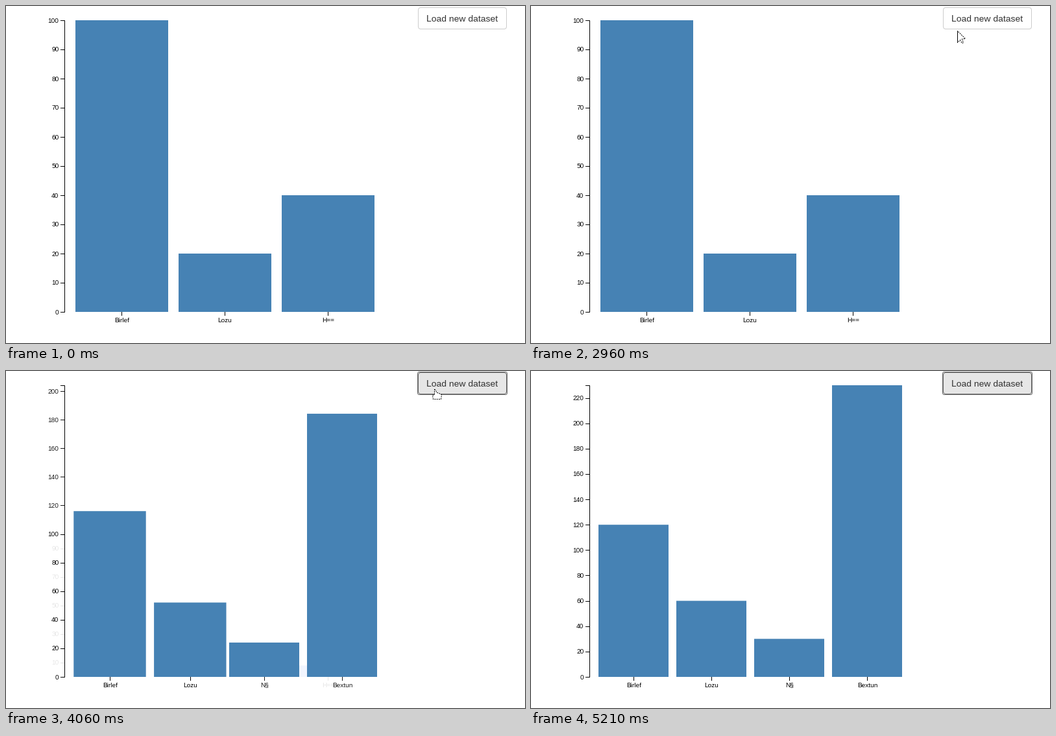
A matplotlib script for the animation above (6.6 s loop, 800 by 520 pixels).

```python
import numpy as np
import matplotlib.pyplot as plt
from matplotlib.animation import FuncAnimation
from matplotlib.patches import FancyBboxPatch, Polygon, Rectangle

plt.rcParams["font.family"] = "Liberation Sans"
plt.rcParams["text.hinting"] = "native"
plt.rcParams["toolbar"] = "None"

W, H, DPI = 800, 520, 100
LOOP, STEP = 6600, 20
PX = 72 / DPI                      # points per pixel
BASE, HEIGHT, AXIS_X = 472, 450, 90
STEEL = np.array([70, 130, 180]) / 255
HOVER = np.array([112, 159, 210]) / 255
FADED = np.array([125, 163, 255]) / 255

CLICK, MORPH, MORPH_LEN = 3290, 3377, 962

# Pointer keys: time, x, y
KEYS = np.array([
    (1300, 822, 450), (1350, 788, 412), (1720, 614, 30), (1860, 614, 30),
    (2140, 503, 264), (2510, 470, 345), (2550, 470, 345), (2960, 657, 38),
    (3040, 661, 29), (4320, 661, 29), (4560, 459, 297), (4640, 434, 341),
    (4690, 434, 341), (5300, 392, 531)], float)
SHOWN = (1350, 5200)

fig = plt.figure(figsize=(W / DPI, H / DPI), dpi=DPI, facecolor="white")
ax = fig.add_axes([0, 0, 1, 1])
ax.set_xlim(0, W)
ax.set_ylim(H, 0)
ax.axis("off")


def mix(a, b, k):
    return a + (b - a) * k


def ease(u):
    u = min(max(u, 0), 1)
    return 4 * u ** 3 if u < 0.5 else 1 - 4 * (1 - u) ** 3


def slopes(times, vals):
    d = np.diff(vals) / np.diff(times)
    inner = [2 * a * b / (a + b) if a * b > 0 else 0 for a, b in zip(d, d[1:])]
    return [0, *inner, 0]


TIMES = KEYS[:, 0]
TRACKS = [(KEYS[:, c], slopes(TIMES, KEYS[:, c])) for c in (1, 2)]


def pointer(t):
    """Monotone cubic path through the pointer keys."""
    i = int(np.clip(np.searchsorted(TIMES, t, "right") - 1, 0, len(TIMES) - 2))
    span = TIMES[i + 1] - TIMES[i]
    u = (t - TIMES[i]) / span
    s = u * u * (3 - 2 * u)
    return [mix(v[i], v[i + 1], s)
            + span * (u * (1 - u) ** 2 * m[i] - u * u * (1 - u) * m[i + 1])
            for v, m in TRACKS]


def stroke(xs, ys, **kw):
    """One pixel wide line, sharp when centred on a pixel."""
    return ax.plot(xs, ys, color="black", lw=PX, solid_capstyle="butt",
                   solid_joinstyle="miter", snap=False, **kw)[0]


def label(x, y, s, size, **kw):
    return ax.text(x, y, s, fontsize=size * PX, va="baseline", **kw)


class Bar:
    """A bar going from one (x, width, height) to another."""

    def __init__(self, start, end, leaving=False, z=2):
        self.start, self.end = np.array(start, float), np.array(end, float)
        self.leaving = leaving
        self.patch = Rectangle((0, 0), 1, 1, lw=0, zorder=z)
        self.patch.set_snap(False)
        ax.add_patch(self.patch)

    def update(self, k, tip):
        x, w, h = mix(self.start, self.end, k)
        self.patch.set_bounds(x, BASE - h, w, h)
        over = tip and x <= tip[0] < x + w and BASE - h <= tip[1] < BASE
        color = HOVER if over else STEEL
        if self.leaving:
            color = mix(color, FADED, k)
            self.patch.set_alpha(1 - k)
        self.patch.set_facecolor(color)


class Tick:
    """An axis tick with its label; it moves and may fade in or out."""

    def __init__(self, text, start, end, fade=0, vertical=True):
        self.start, self.end, self.fade = start, end, fade
        self.vertical = vertical
        if vertical:
            self.line = stroke([AXIS_X - 6, AXIS_X], [0, 0])
            self.text = label(AXIS_X - 8.5, 0, text, 10, ha="right")
        else:
            self.line = stroke([0, 0], [BASE, BASE + 6])
            self.text = label(0, BASE + 16, text, 10, ha="center")

    def update(self, k):
        p = mix(self.start, self.end, k)
        mid = round(p) + 0.5
        if self.vertical:
            self.line.set_ydata([mid, mid])
            self.text.set_y(p + 3.5)
        else:
            self.line.set_xdata([mid, mid])
            self.text.set_x(p + 0.5)
        alpha = {0: 1, 1: k, -1: 1 - k}[self.fade]
        for part in (self.line, self.text):
            part.set_alpha(alpha)
            part.set_visible(alpha > 0 and p > -20)


class Sprite:
    """White pointer shape with a dashed rim and an optional solid side."""

    def __init__(self, points, side=None):
        self.points = np.array(points, float)
        self.side = side
        self.body = Polygon(self.points, closed=True, fc="white", lw=0, zorder=8)
        ax.add_patch(self.body)
        self.rim = stroke([], [], zorder=9, dashes=(2, 1.3))
        self.edge = stroke([], [], zorder=9)

    def update(self, x, y, visible):
        pts = self.points + (x, y)
        self.body.set_xy(pts)
        loop = np.vstack([pts, pts[:1]])
        self.rim.set_data(loop[:, 0], loop[:, 1])
        if self.side:
            self.edge.set_data(pts[self.side, 0], pts[self.side, 1])
        for part in (self.body, self.rim, self.edge):
            part.set_visible(visible)


def box(x0, y0, x1, y1, r, **kw):
    patch = FancyBboxPatch((x0, y0), x1 - x0, y1 - y0,
                           boxstyle=f"round,pad=0,rounding_size={r}",
                           lw=PX, snap=False, **kw)
    ax.add_patch(patch)
    return patch


# Bars: x, width, height for each dataset
unit0, unit1 = HEIGHT / 100, HEIGHT / 230
bars = [
    Bar((425, 143, 40 * unit0), (425, 143, 0), leaving=True, z=1),
    Bar((107, 143, 100 * unit0), (104, 108, 120 * unit1)),
    Bar((266, 143, 20 * unit0), (224, 108, 60 * unit1)),
    Bar((344, 108, 0), (344, 108, 30 * unit1)),
    Bar((464, 108, 0), (464, 108, 230 * unit1)),
]

# Axes
stroke([AXIS_X - 6, AXIS_X + 0.5, AXIS_X + 0.5, AXIS_X - 6],
       [22.5, 22.5, BASE + 0.5, BASE + 0.5])
ticks = []
for v in range(0, 221, 10):
    if v > 100 and v % 20:
        continue
    fade = 1 if v > 100 else -1 if v % 20 else 0
    ticks.append(Tick(str(v), BASE - v * unit0, BASE - v * unit1, fade))
for name, a, b, fade in [("Birlef", 178, 158, 0), ("Lozu", 337, 278, 0),
                         ("H==", 496, 496, -1), ("N§", 398, 398, 1),
                         ("Bextun", 518, 518, 1)]:
    ticks.append(Tick(name, a, b, fade, vertical=False))

# Button
ring = box(634.5, 1.5, 772.5, 36.5, 2.5, fc="none", ec="#707070", zorder=4)
button = box(635.5, 2.5, 771.5, 35.5, 4, fc="white", ec="#cccccc", zorder=3)
label(703.5, 24, "Load new dataset", 14, ha="center", color="#333333", zorder=5)

arrow = Sprite([(0.5, 0.5), (0.5, 18.5), (4.5, 14.5), (7.5, 19.5),
                (9.5, 18.5), (7.5, 13), (12.5, 12.5)], side=[0, 1])
hand = Sprite([(3.5, 0.5), (5.5, 1.5), (6.5, 5), (13, 7.5), (14.5, 9),
               (13.5, 15.5), (1.5, 15.5), (0.5, 9.5), (3.5, 8.5)])


def draw(frame):
    t = frame * STEP
    k = ease((t - MORPH) / MORPH_LEN)
    shown = SHOWN[0] <= t < SHOWN[1]
    x, y = pointer(t) if shown else (0, 0)
    on_button = shown and 635 <= x < 772 and 2 <= y < 36

    for bar in bars:
        bar.update(k, (x, y) if shown else None)
    for tick in ticks:
        tick.update(k)

    focus = t >= CLICK
    button.set_facecolor("#e6e6e6" if on_button or focus else "white")
    button.set_edgecolor("#6a6a6a" if focus else
                         "#adadad" if on_button else "#cccccc")
    ring.set_visible(focus)

    arrow.update(round(x), round(y), shown and not on_button)
    hand.update(round(x) - 4, round(y) - 1, on_button)
    return []


anim = FuncAnimation(fig, draw, frames=LOOP // STEP, interval=STEP,
                     init_func=lambda: draw(0), repeat=True, blit=False)
plt.show()
```
